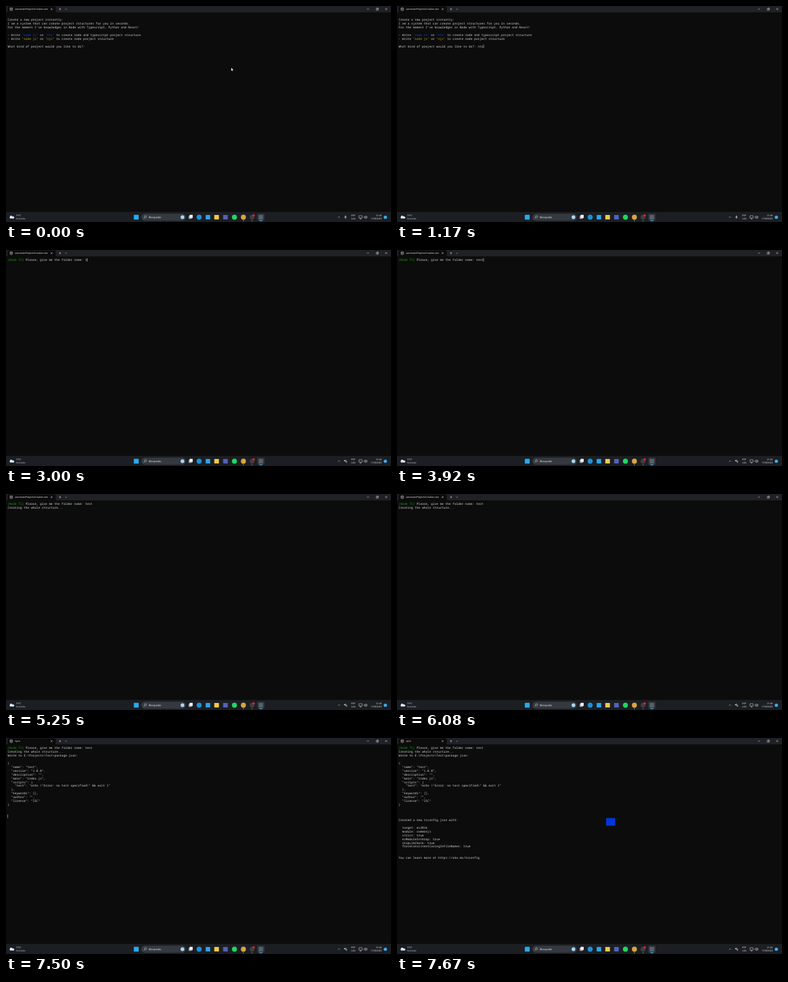
An HTML page for the animation above (8 s loop, 600 by 338 pixels).

```html
<!DOCTYPE html>
<html lang="en">
<head>
<meta charset="utf-8">
<title>Project creator terminal</title>
<style>
  html, body { margin: 0; width: 100%; height: 100%; overflow: hidden; background: #0c0c0c; }
  svg { display: block; width: 600px; height: 338px; }
  text { white-space: pre; text-rendering: geometricPrecision; }
  .term { font: 4.6875px "Noto Sans Mono", monospace; fill: #d6d6d6; }
  .ui { font: 3.65px "Open Sans", sans-serif; fill: #f2f2f2; }
  .ui .end { text-anchor: end; }
  .blue { fill: #0a50d8; }
  .gold { fill: #c8a312; }
  .green { fill: #13a10e; }
  .line { fill: none; stroke: #dcdcdc; stroke-width: .55; }
</style>
</head>
<body>
<svg viewBox="0 0 600 338">
  <rect width="600" height="338" fill="#0c0c0c"/>

  <!-- window bar -->
  <rect width="600" height="10" fill="#1f2126"/>
  <path d="M1 10q1.500 0 1.500-1.500V2.500q0-2 2-2H75.500q2 0 2 2V8.500q0 1.500 1.500 1.500z" fill="#0c0c0c"/>
  <g class="line">
    <rect x="6.300" y="2.900" width="3.800" height="4.200" rx=".5"/>
    <path d="M6.300 4.200h3.800M7.300 5.600h1.800"/>
    <path d="M69.700 3.500l2.800 2.800m0-2.800l-2.800 2.800"/>
    <path d="M82.500 4.900h3.400m-1.700-1.700v3.400M92.300 4.400l1.200 1.200 1.200-1.200"/>
    <path d="M562.500 4.900h3.200M577 4.100h2.500v2.500h-2.500zM577.800 4v-.8h2.500v2.600h-.8M591 3.300l3 3m0-3l-3 3"/>
  </g>
  <g class="ui" id="titles"></g>

  <g class="term" id="term"></g>

  <path id="pointer" d="M351 96.800v4.600l1.100-1 .8 1.700.8-.4-.8-1.600h1.500z" fill="#fff" stroke="#222" stroke-width=".2"/>

  <!-- taskbar -->
  <rect y="323" width="600" height="15" fill="#1b1e23"/>
  <rect y="322.700" width="600" height=".4" fill="#30333a"/>
  <g fill="#dfe8f2">
    <circle cx="8" cy="330" r="2.100"/><circle cx="11" cy="330.700" r="1.700" fill="#8db8e8"/>
    <rect x="5.700" y="329.800" width="7" height="2.700" rx="1.350"/>
  </g>
  <g class="ui">
    <text x="15.500" y="329.300">19°C</text>
    <text x="15.500" y="334.300" fill="#b9bcc0">Nublado</text>
  </g>
  <rect x="211" y="325.200" width="69" height="10.600" rx="5.300" fill="#343940" stroke="#454a50" stroke-width=".3"/>
  <g class="line" stroke-width=".7">
    <circle cx="217.300" cy="329.800" r="1.600"/><path d="M216.200 331l-1.500 1.600"/>
  </g>
  <text class="ui" x="222.500" y="331.900" style="font-size:4.050px">Búsqueda</text>
  <rect x="284.500" y="328.300" width="5" height="5" rx=".5" fill="#8b8f94"/>
  <rect x="286" y="326.800" width="5" height="5" rx=".5" fill="#eceef0"/>
  <rect x="391.500" y="325" width="11.500" height="11" rx="1.300" fill="#30343a"/>
  <g id="icons"></g>
  <g fill="#9a9da2">
    <rect x="369" y="335.500" width="2" height=".9" rx=".45"/>
    <rect x="382.500" y="335.500" width="2" height=".9" rx=".45"/>
    <rect x="394.700" y="335.300" width="5" height="1.100" rx=".55" fill="#4cb4f0"/>
  </g>

  <!-- tray -->
  <g class="line">
    <path d="M517.400 331.200l1.600-1.600 1.600 1.600"/>
    <path d="M550 328.200h5v3.700h-5zM551.200 333.300h2.600m-1.300-1.300v1.300"/>
    <path d="M558 329.600h1l1.300-1.300v4.400l-1.300-1.300h-1zM561.200 329.400q.8 1.100 0 2.200M562 328.500q1.600 2 0 4"/>
  </g>
  <g id="mic">
    <rect x="528.400" y="328" width="1.300" height="2.800" rx=".65" fill="#e4e4e4"/>
    <path class="line" d="M527.600 330q0 1.700 1.450 1.700t1.450-1.700m-1.450 1.700v1.300"/>
  </g>
  <g id="micOn">
    <path d="M526.200 329.800l3.600-1.700-1.500 3.600-.6-1.400z" fill="#cfd6d2"/>
    <rect x="530" y="329.300" width="1.100" height="2.100" rx=".55" fill="#58c48a"/>
    <path class="line" d="M529.400 330.800q0 1.300 1.150 1.300t1.150-1.300m-1.150 1.300v1"/>
  </g>
  <g class="ui">
    <text x="538" y="329.300">ESP</text>
    <text x="538" y="334.300">LAA</text>
    <text class="end" x="585.700" y="329.300">21:46</text>
    <text class="end" x="585.700" y="334.300">17/8/2023</text>
  </g>
</svg>

<script>
const LOOP = 8000, CELL = 2.8125, ROW = 5.9375, LEFT = 2.5, TOP = 12.5;
const $ = id => document.getElementById(id);
const cues = [];

function add(parent, tag, attrs, html = '') {
  const el = document.createElementNS('http://www.w3.org/2000/svg', tag);
  for (const k in attrs) el.setAttribute(k, attrs[k]);
  el.innerHTML = html;
  return parent.appendChild(el);
}
const cue = (el, from, to = LOOP) => cues.push({ el, from, to });
const ink = (color, s) => `<tspan class="${color}">${s}</tspan>`;

// Prints consecutive lines starting at a terminal cell
function print(row, lines, from, to, col = 0) {
  lines.forEach((s, i) => s && cue(add($('term'), 'text', {
    x: LEFT + col * CELL, y: TOP + (row + i) * ROW + 4.6
  }, s), from, to));
}
function caret(row, col, from, to) {
  cue(add($('term'), 'rect', {
    x: LEFT + col * CELL, y: TOP + row * ROW + .2, width: .6, height: 5.6
  }), from, to);
}
// Types a word: one time per key, then the moment it is cleared
function type(row, col, word, times, end, caretEnd) {
  times.forEach((t, i) => {
    const last = i === times.length - 1;
    print(row, [word.slice(0, i + 1)], t, last ? end : times[i + 1], col);
    caret(row, col + i + 1, t, last ? caretEnd : times[i + 1]);
  });
}

// Menu
print(1, [
  'Create a new project instantly:',
  'I am a system that can create project structures for you in seconds.',
  "For the moment I've knowledges in Node with Typescript, Python and React!",
  '',
  `- Write ${ink('blue', '"node ts"')} or ${ink('blue', '"nts"')} to create node and typescript project structure`,
  `- Write ${ink('gold', '"node js"')} or ${ink('gold', '"njs"')} to create node project structure`,
  '',
  'What kind of project would you like to do?:'
], 0, 1750);
caret(8, 44, 80, 670);
type(8, 44, 'nts', [830, 1000, 1170], 1750, 1750);

// Folder name
print(0, [`${ink('green', '[Node TS]')} Please, give me the folder name:`], 1750);
caret(0, 43, 1750, 2330);
caret(0, 43, 2920, 3000);
type(0, 43, 'test', [3000, 3670, 3830, 3920], LOOP, 4330);

// Scaffolding
print(1, ['Creating the whole structure...'], 4330);
for (const [from, to] of [[4330, 4920], [5500, 6080], [6580, 7170]]) caret(2, 0, from, to);
print(2, [
  'Wrote to E:\\Projects\\Test\\package.json:',
  '',
  '{',
  '  "name": "test",',
  '  "version": "1.0.0",',
  '  "description": "",',
  '  "main": "index.js",',
  '  "scripts": {',
  '    "test": "echo \\"Error: no test specified\\" &amp;&amp; exit 1"',
  '  },',
  '  "keywords": [],',
  '  "author": "",',
  '  "license": "ISC"',
  '}'
], 7500);
caret(18, 0, 7500, 7670);
print(19, [
  'Created a new tsconfig.json with:',
  '',
  '  target: es2016',
  '  module: commonjs',
  '  strict: true',
  '  esModuleInterop: true',
  '  skipLibCheck: true',
  '  forceConsistentCasingInFileNames: true',
  '', '',
  'You can learn more at https://aka.ms/tsconfig'
], 7670);
cue(add($('term'), 'rect', {
  x: LEFT + 115 * CELL, y: TOP + 19 * ROW, width: 5 * CELL, height: 2 * ROW, class: 'blue', style: 'fill:#0037da'
}), 7670);

// Tab titles
for (const [s, from, to] of [
  ['automateProjectsCreation.exe', 0, 6500],
  ['npm', 6500, 7170],
  ['npm init', 7170, 7500],
  ['npm', 7500, LOOP]
]) cue(add($('titles'), 'text', { x: 14, y: 6.3 }, s), from, to);

cue($('pointer'), 0, 830);
cue($('mic'), 0, 3000);
cue($('micOn'), 3000);

// Taskbar apps: centre, radius, colour, round?
for (const [x, r, fill, round] of [
  [203, 3.8, '#29a9ee', 0], [275, 2.9, '#a9d4ee', 1], [301, 3.9, '#1f8fd6', 1],
  [314.7, 3.5, '#2ba3ea', 0], [328.2, 3.6, '#f5c84b', 0], [342, 3.6, '#5561b8', 0],
  [356, 3.9, '#1ed760', 1], [370, 3.9, '#d9a441', 1], [383.4, 3.8, '#3c3d42', 1],
  [386, 1.9, '#e8202a', 1], [397.2, 3.4, '#59616a', 0], [591.2, 2.6, '#3fa9e8', 1]
]) {
  const y = r === 1.9 ? 327.6 : 330.5;
  if (round) add($('icons'), 'circle', { cx: x, cy: y, r, fill });
  else add($('icons'), 'rect', { x: x - r, y: y - r, width: 2 * r, height: 2 * r, rx: .6, fill });
}

function draw() {
  const t = performance.now() % LOOP;
  for (const { el, from, to } of cues) el.style.display = t >= from && t < to ? '' : 'none';
  requestAnimationFrame(draw);
}
draw();
</script>
</body>
</html>
```
